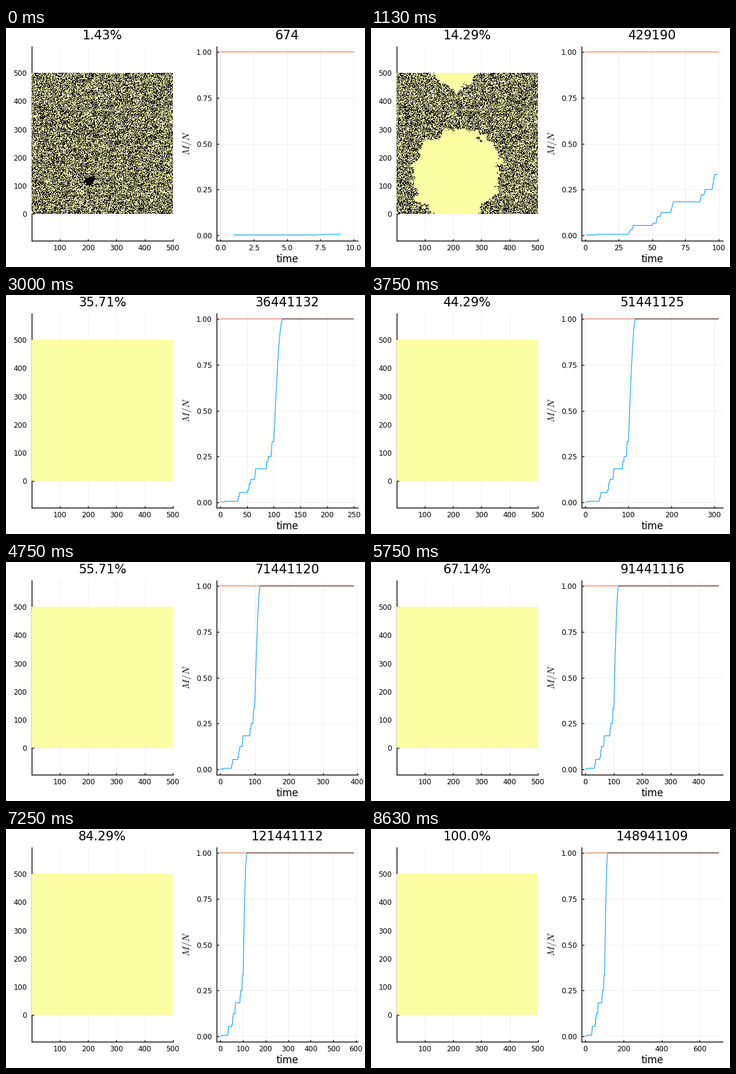
Animation, 600 px wide and 400 px high, one loop 8760 ms. Source, as a matplotlib script:

```python
import numpy as np
import matplotlib.pyplot as plt
from matplotlib.animation import FuncAnimation

W, H, PX = 600, 400, 0.72        # stage size, points per pixel
LOOP, TICK, STATES = 8760, 40, 70
SIZE, CELLS = 500, 236           # lattice units, visible cells per side

plt.rcParams.update({
    "font.family": "DejaVu Sans", "mathtext.fontset": "cm",
    "xtick.direction": "in", "ytick.direction": "in",
    "xtick.major.size": 3.5 * PX, "ytick.major.size": 3.5 * PX,
    "xtick.major.width": 1.3 * PX, "ytick.major.width": 1.3 * PX,
    "xtick.major.pad": 6.7 * PX, "ytick.major.pad": 7.5 * PX,
    "xtick.labelsize": 12 * PX, "ytick.labelsize": 12 * PX,
    "axes.linewidth": 1.4 * PX, "axes.spines.top": False,
    "axes.spines.right": False, "axes.grid": True, "axes.axisbelow": True,
    "grid.color": "#ebebeb", "grid.linewidth": 0.8 * PX,
})

# magnetisation: sudden jumps (start, rise), then a smooth run to saturation
START = 0.0027
JUMPS = [(7, .0035), (32.5, .026), (35, .022), (50, .013), (53, .036),
         (56, .022), (64.5, .058), (86, .038), (89, .029), (95.5, .081)]
RUN, FULL = 100, 117


def magnet(n):
    n = np.asarray(n, float)
    m = START + sum(rise * np.clip(n - at, 0, 1) for at, rise in JUMPS)
    t = np.clip((n - RUN) / (FULL - RUN), 0, 1)
    return m + (1 - m) * np.sin(np.pi / 2 * t)


def flips(n):
    """Cumulative flips: geometric growth, then one whole cluster per step."""
    if n <= RUN:
        return round(674 * (429190 / 674) ** ((n - 10) / 90))
    if n < FULL:
        return flips(120) - int(SIZE ** 2 * magnet(np.arange(n + 1, 121)).sum())
    stray = int(50 * (1 - (190 / n) ** 0.85))
    return 21441142 + SIZE ** 2 * (n - 190) - stray


def smooth(field, sigma):
    """Periodic Gaussian blur, scaled back to unit deviation."""
    f = np.fft.fftfreq(CELLS)
    k = np.exp(-2 * (np.pi * sigma) ** 2 * (f[:, None] ** 2 + f ** 2))
    out = np.fft.ifft2(np.fft.fft2(field) * k).real
    return out / out.std()


def make_lattice():
    """Random spins, and the order in which cells join the growing domain."""
    rng = np.random.default_rng(7)
    noise = lambda: rng.standard_normal((CELLS, CELLS))
    spin = noise() + 0.2 * smooth(noise(), 1)
    base = (spin > np.median(spin)).astype(int)
    base[(base == 1) & (rng.random(base.shape) < 0.22)] = 2

    radii = [161, 185, 173, 160, 158, 142, 180, 130]   # every 45 degrees
    angles = np.arange(8) * np.pi / 4
    c = (np.arange(CELLS) + 0.5) * SIZE / CELLS
    x, y = np.meshgrid(c, c)
    dist = np.full(x.shape, np.inf)
    for ox in (-SIZE, 0, SIZE):
        for oy in (-SIZE, 0, SIZE):
            dx, dy = x - 210 - ox, y - 120 - oy
            edge = np.interp(np.arctan2(dy, dx), angles, radii,
                             period=2 * np.pi)
            dist = np.minimum(dist, np.hypot(dx, dy) / edge)
    for sigma, amount in ((1, 0.02), (3, 0.035), (7, 0.03)):
        dist = dist + amount * smooth(noise(), sigma)
    rank = dist.ravel().argsort().argsort().reshape(dist.shape) / dist.size
    return base, rank


BASE, RANK = make_lattice()
COLORS = np.array([(0, 0, 4), (252, 255, 164), (255, 255, 255)], np.uint8)


def lattice(n):
    if n >= FULL:
        return COLORS[np.ones_like(BASE)]
    domain = 0 if n <= 30 else 1
    return COLORS[np.where(RANK < magnet(n) - START, domain, BASE)]


def time_ticks(n):
    """Pick the step with the best mix of tick count and roundness."""
    top, best = 1.03 * n, (-1, 1)
    for q, nice in ((2.5, .5), (1, 1), (5, .9), (2, .7)):
        for p in (0.1, 1, 10, 100):
            step = q * p
            count = int(top / step + 1e-9) + 1
            score = round(1 - abs(count - 5) / 5 + nice, 6)
            if count > 1 and score > best[0]:
                best = (score, step)
    ticks = np.arange(0, top, best[1])
    fmt = "{:.1f}" if best[1] % 1 else "{:.0f}"
    return ticks, [fmt.format(t) for t in ticks]


def axes(x0, x1, top, bottom=355.5):
    return fig.add_axes([x0 / W, 1 - bottom / H, (x1 - x0) / W,
                         (bottom - top) / H])


def label(x, y, text, size, **kw):
    return fig.text(x / W, 1 - y / H, text, fontsize=size * PX, ha="center",
                    **kw)


def line(color, z):
    return right.plot([], [], color=color, lw=1.1 * PX, zorder=z,
                      snap=False)[0]


fig = plt.figure(figsize=(6, 4), dpi=100, facecolor="white")

left = axes(42.5, 279, 31)
unit = CELLS / SIZE
image = left.imshow(lattice(10), origin="lower", interpolation="nearest",
                    extent=(0.5, 500.5, 0.5, 500.5), aspect="auto", zorder=3)
left.set(xlim=(0.5 - 0.5 / unit, 500.5),
         ylim=(0.5 - 44.5 / unit, 0.5 + 280 / unit),
         xticks=range(100, 501, 100), yticks=range(0, 501, 100))

right = axes(351.8, 587.7, 30.8)
quarters = np.arange(0, 1.01, 0.25)
right.set(ylim=(-0.0272, 1.03), yticks=quarters)
right.set_yticklabels([f"{v:.2f}" for v in quarters])
curve, limit, overlap = (line("#009afa", 3), line("#e26f46", 4),
                         line("#6b4a50", 5))

percent = label(161, 18.8, "", 21)
counter = label(470, 18.8, "", 21)
label(470, 392, "time", 16.5)
label(303, 193, "$M/N$", 16.5, rotation=90, va="center")


def update(k):
    state = min((k * TICK + 30) // 125, STATES - 1)
    n = 10 * (state + 1)
    image.set_data(lattice(n))
    percent.set_text(f"{round(n / 7, 2)}%")
    counter.set_text(str(flips(n)))
    steps = np.arange(1, n)
    curve.set_data(steps, magnet(steps))
    limit.set_data([0, n], [1, 1])
    full = steps[steps >= FULL]
    overlap.set_data(full, np.ones(len(full)))
    right.set_xlim(-0.03 * n, 1.03 * n)
    right.set_xticks(*time_ticks(n))
    return image, percent, counter, curve, limit, overlap


anim = FuncAnimation(fig, update, frames=LOOP // TICK, interval=TICK,
                     init_func=lambda: update(0), repeat=True, repeat_delay=0)
plt.show()
```
